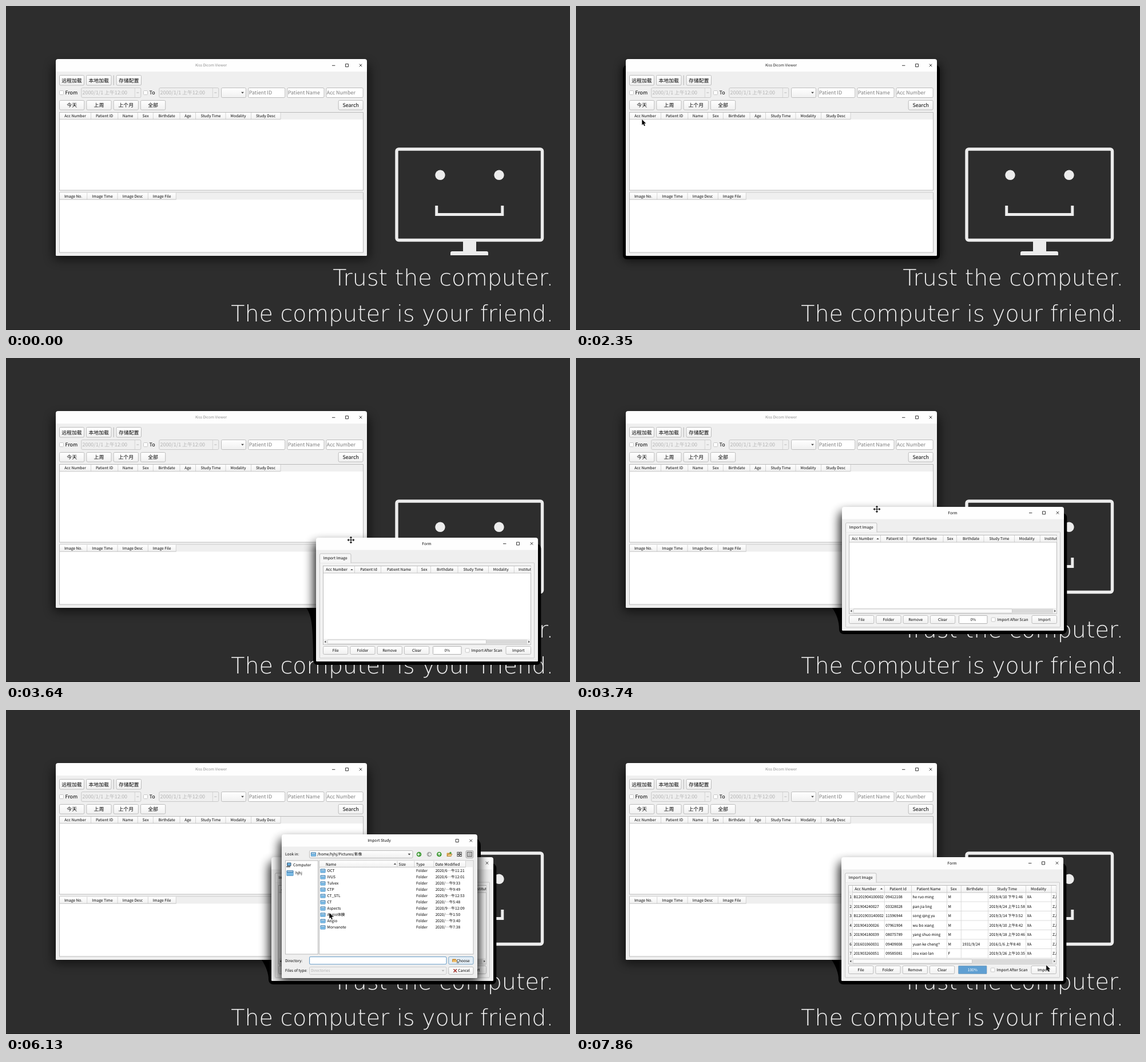
An HTML page for the animation above (8000 ms loop, 986 by 568 pixels).

```html
<!DOCTYPE html>
<html lang="zh-CN">
<head>
<meta charset="utf-8">
<title>Dicom import</title>
<style>
html, body { margin: 0; width: 100%; height: 100%; overflow: hidden; background: #2d2d2d; }
svg { display: block; width: 100%; height: 100%; }
text { font-family: "Noto Sans CJK SC", "Noto Sans CJK JP", "Noto Sans CJK", "Noto Sans", sans-serif; text-rendering: geometricPrecision; white-space: pre; }
.wall { font-family: "DejaVu Sans", sans-serif; font-weight: 200; font-size: 39.6px; fill: #f2f2f2; text-anchor: end; }
</style>
</head>
<body>
<svg id="stage" viewBox="0 0 986 568" xmlns="http://www.w3.org/2000/svg"></svg>
<script>
const LOOP = 8000, SMALL = 6.65, BIG = 8.9;
const $ = id => document.getElementById(id);

// Markup helpers
const group = (id, body, extra = '') => `<g id="${id}" ${extra}>${body}</g>`;
const rect = (x, y, w, h, fill, extra = '') =>
  `<rect x="${x}" y="${y}" width="${w}" height="${h}" fill="${fill}" ${extra}/>`;
const path = (d, stroke, w = 1, fill = 'none') =>
  `<path d="${d}" fill="${fill}" stroke="${stroke}" stroke-width="${w}"/>`;
const text = (x, y, s, size = SMALL, extra = '') =>
  `<text x="${x}" y="${y + size * 0.37}" font-size="${size}" ${extra}>${s}</text>`;
const mid = (x, y, s, size, fill) =>
  text(x, y, s, size, 'text-anchor="middle"' + (fill ? ` fill="${fill}"` : ''));
const box = (x, y, w, h, fill = '#fff', line = '#b4b4b4', r = 0) =>
  rect(x + .5, y + .5, w - 1, h - 1, fill, `stroke="${line}" stroke-width=".9" rx="${r}"`);
const button = (x, y, w, h, label, size) =>
  box(x, y, w, h, 'url(#raised)', '#b6b6b6', 2) + mid(x + w / 2, y + h / 2, label, size);
const check = (x, y, s) => box(x, y, s, s, '#fff', '#c2c2c2', 1);
const arrow = (x, y, fill = '#444') => `<path d="M${x - 2.4} ${y - 1.2}h4.8l-2.4 2.6z" fill="${fill}"/>`;
const sortMark = (x, y) => `<path d="M${x - 2.2} ${y + 1}h4.4l-2.2 -2.4z" fill="#444"/>`;

function windowIcons(x, y, withMin) {
  const c = '#3a3a3a';
  return (withMin ? path(`M${x - 50} ${y + .3}h5.4`, c) : '') +
    path(`M${x - 26.5} ${y - 2.4}h5v5h-5z`, c) +
    path(`M${x - 2.3} ${y - 2.3}l4.6 4.6m0 -4.6l-4.6 4.6`, c);
}

const shade = (id, x, y, w, h) =>
  rect(x - 4, y + 9, w + 8, h - 3, '#000', `id="${id}" rx="6" opacity=".9" filter="url(#soft)"`);

function frame(x, y, w, h, bar) {
  const top = `M${x} ${y + bar}v${4 - bar}q0 -4 4 -4h${w - 8}q4 0 4 4v${bar - 4}z`;
  return rect(x, y + 6, w, h - 6, '#efefef', 'rx="1.5"') + `<path d="${top}" fill="#fefefe"/>`;
}

// Header strip: cell edges, then centred labels
function header(x, y, h, edges, centers, labels) {
  const end = edges[edges.length - 1];
  return rect(x, y, end - x, h, 'url(#raised)') +
    edges.map(e => path(`M${e} ${y}v${h}`, '#cacaca', .8)).join('') +
    path(`M${x} ${y + h}H${end}`, '#b9b9b9', .8) +
    labels.map((s, i) => mid(centers[i], y + h / 2, s)).join('');
}

function folder(x, y, w) {
  const h = w * .78;
  return rect(x, y - h / 2, w, h, '#2f76ad', 'rx="1"') +
    rect(x + 1, y - h / 2 + 1.2, w - 2, 1.2, '#e8f2f9') +
    rect(x + .4, y - h / 2 + h * .4, w - .8, h * .55, '#79b9e4', 'rx=".6"');
}

function wallpaper() {
  const c = '#ececec';
  return rect(0, 0, 986, 568, '#2d2d2d') + rect(0, 567, 986, 1, '#202020') +
    rect(683, 251, 254.5, 159.5, 'none', `stroke="${c}" stroke-width="5.4" rx="3.5"`) +
    rect(799, 412, 23, 19, c) +
    `<path d="M777 437v-4q0 -3 3 -3h60q3 0 3 3v4z" fill="${c}"/>` +
    [759, 862].map(x => `<circle cx="${x}" cy="296.3" r="8.7" fill="${c}"/>`).join('') +
    path('M752.7 350V365.6H867.8V350', c, 5) +
    '<text class="wall" x="957" y="490">Trust the computer.</text>' +
    '<text class="wall" x="957" y="553.4">The computer is your friend.</text>';
}

function mainWindow() {
  const grey = 'fill="#7d7d7d"', off = 'fill="#b3b3b3"';
  const date = x => box(x, 143, 105, 18, '#efefef', '#c4c4c4', 2) +
    path(`M${x + 94} 143.5v17`, '#cfcfcf', .8) + path(`M${x + 97} 152h4`, '#b8b8b8') +
    text(x + 2.3, 152, '2000/1/1 上午12:00', BIG, off);
  return frame(87, 93, 544, 345, 22) +
    group('mainTitle', mid(358.5, 104, 'Kiss Dicom Viewer', 6.55)) + windowIcons(620, 104, true) +
    button(93, 121, 44, 18.5, '远程加载', BIG) + button(140, 121, 44.5, 18.5, '本地加载', BIG) +
    path('M188.2 121.5v17.5', '#b0b0b0') + button(192.5, 121, 44.5, 18.5, '存储配置', BIG) +
    check(93, 148, 8) + text(103.5, 152, 'From', BIG) + date(131.3) +
    check(240, 148, 8) + text(250.5, 152, 'To', BIG) + date(267.3) +
    box(376, 143, 44, 18, 'url(#raised)', '#b6b6b6', 2) + arrow(413.5, 152) +
    ['Patient ID', 'Patient Name', 'Acc Number'].map((s, i) =>
      box(423 + 68.2 * i, 143, 65.3, 18, '#fff', '#b4b4b4', 2) + text(424.8 + 68 * i, 152, s, BIG, grey)).join('') +
    ['今天', '上周', '上个月', '全部'].map((s, i) => button(93 + 47.3 * i, 165, 44.3, 17.6, s, BIG)).join('') +
    button(580.7, 165, 44, 17.6, 'Search', BIG) +
    box(93, 186, 532, 137.5) + rect(94, 187, 530, 12, '#efefef') +
    header(94, 187, 11.7, [148.5, 195.7, 230.3, 257.3, 304, 331.5, 384, 428.5, 480],
      [121, 172, 213, 244, 281, 318, 358, 406, 454],
      ['Acc Number', 'Patient ID', 'Name', 'Sex', 'Birthdate', 'Age', 'Study Time', 'Modality', 'Study Desc']) +
    box(93, 326.5, 532, 106) + rect(94, 327.5, 530, 12, '#efefef') +
    header(94, 327.5, 11.7, [141.7, 195, 248.3, 297.3], [117.5, 168.5, 221.5, 272.5],
      ['Image No.', 'Image Time', 'Image Desc', 'Image File']);
}

const patients = [
  'B1201904100002|09412108|he ruo ming|M||2019/4/10 下午1:46',
  '201904240027|03328028|pan jia ling|M||2019/4/24 上午11:58',
  'B1201903140002|11596944|song qing yu|M||2019/3/14 下午3:52',
  '201904100026|07961904|wu bo xiang|M||2019/4/10 上午8:42',
  '201904180039|08075789|yang shuo ming|M||2019/4/18 上午10:46',
  '201601060031|09409008|yuan ke cheng^|M|1931/9/24|2016/1/6 上午8:40',
  '201903260051|09585081|zou xiao lan|F||2019/3/26 上午10:35'
];
const formCols = ['Acc Number', 'Patient Id', 'Patient Name', 'Sex', 'Birthdate', 'Study Time', 'Modality'];
const cellEdges = [19.5, 75.3, 122.5, 184.5, 209.3, 256.5, 322.5, 367, 400];

// Drawn in window coordinates and moved as a whole
function formWindow() {
  const row = (line, i) => {
    const y = 69.6 + 16.5 * i, cells = (line + '|XA|ZJ').split('|');
    return group('row' + i, rect(13, y - 8, 6.5, 16.5, '#f4f4f4') + mid(16.2, y, i + 1) +
      cellEdges.map(x => path(`M${x} ${y - 8}v16.5`, '#d3d3d3', .8)).join('') +
      path(`M13 ${y + 8.4}H376`, '#d3d3d3', .8) +
      cells.map((s, k) => text(cellEdges[k] + 2, y, s)).join(''));
  };
  const scroll = (id, end) => group(id, box(19.5, 178.5, end - 19.5, 8, '#fafafa', '#c8c8c8', 1));
  return frame(0, 0, 388, 217, 21.5) + mid(193.5, 10.5, 'Form') + windowIcons(377, 10.3, true) +
    box(6, 43.5, 376, 168, '#f2f2f2', '#c4c4c4', 1) +
    '<path d="M6.5 44.5V30q0 -2 2 -2h50.5q2 0 2 2V44.5" fill="#f6f6f6" stroke="#bcbcbc" stroke-width=".9"/>' +
    mid(33.6, 36, 'Import Image') + box(12, 49, 364, 139) +
    '<g clip-path="url(#cells)">' +
    group('headEmpty', header(13, 50, 12, [67.5, 113.5, 177, 200.5, 248, 301.5, 346.3, 400],
      [36, 92, 145, 189, 225.5, 275, 323.3], formCols) + text(354, 56, 'Institution') + sortMark(62.5, 56)) +
    group('headFull', header(13, 50, 12, cellEdges, [42, 99, 152.5, 196, 233, 289.5, 344.5], formCols) + sortMark(70, 55.5)) +
    patients.map(row).join('') +
    rect(13, 177.5, 362.5, 10, '#f0f0f0') + rect(20, 178.5, 349, 8, '#dadada') +
    scroll('barWide', 298) + scroll('barShort', 229) + '</g>' +
    '<path d="M17.2 180.5v4l-2.4 -2zM371.3 180.5v4l2.4 -2z" fill="#444"/>' +
    ['File', 'Folder', 'Remove', 'Clear'].map((s, i) => button(12 + 47.3 * i, 190, 44.3, 15, s)).join('') +
    box(204, 190, 50.5, 15, '#fff', '#aaa', 1) + rect(204.5, 190.5, 0, 14, '#5f9fd2', 'id="fill"') +
    text(229.3, 197.6, '0%', SMALL, 'text-anchor="middle" id="percent"') +
    check(260.7, 193.7, 7.8) + text(271.3, 197.6, 'Import After Scan') + button(331.5, 190, 44.5, 15, 'Import');
}

const studies = ['Zouxiaolan', 'Yuankecheng', 'Yangshuoming-LCX', 'Yangshuoming-LAD', 'Wuboxiang',
  'Songqingyu', 'Panjialing', 'Heruoming'].map(s => [s, '2020/…午4:20']);
const parent = [['OCT', '2020/6…午11:21'], ['IVUS', '2020/6…午12:01'], ['Tulvex', '2020/…午9:33'],
  ['CTP', '2020/…午9:49'], ['CT_STL', '2020/9…午12:53'], ['CT', '2020/…午5:48'], ['Aspects', '2020/9…午12:09'],
  ['Angio体膜', '2020/…午1:50'], ['Angio', '2020/…午3:40'], ['Morvanote', '2020/…午7:38']];

function dialogWindow() {
  const list = (id, dir, rows) => group(id, text(544, 253, dir) + rows.map(([name, date], i) => {
    const y = 282 + 11 * i;
    return folder(549.5, y, 9) + `<g class="${name}">` + text(561.5, y, name) +
      text(717, y, 'Folder') + text(750.7, y, date) + '</g>';
  }).join(''));
  const disc = (x, fill, turn) => `<g transform="translate(${x} 253) rotate(${turn})">
    <circle r="4.3" fill="${fill}"/><path d="M2.5 0H-2M0 -2.2L-2.3 0L0 2.2" fill="none" stroke="#fff" stroke-width="1.2"/></g>`;
  const tiles = [0, 1, 2, 3].map(i => rect(789 + (i % 2) * 4.3, 249.3 + (i >> 1) * 4.3, 3, 3, '#fff', 'stroke="#333" stroke-width=".9"')).join('');
  return frame(482, 218, 342, 252, 21.5) + mid(652.5, 229, 'Import Study') + windowIcons(812.7, 229) +
    text(488, 253, 'Look in:') + box(530, 246, 181.5, 14, 'url(#raised)', '#b6b6b6', 2) + folder(533, 253, 9) + arrow(705, 253) +
    disc(722, '#3f9a35', 0) + disc(740, '#a9a9a9', 180) + disc(757.3, '#3f9a35', 90) +
    rect(770.5, 250.5, 8, 6, '#d9a24c', 'rx="1"') + path('M771 256.5l2 -4h7l-2 4z', '#8a6324', .6, '#efc67c') +
    '<circle cx="777" cy="250.5" r="1.7" fill="#4a9e3d"/>' + tiles +
    box(803.5, 246, 14, 14, '#d6d6d6', '#a5a5a5', 2) + rect(806.7, 249.3, 7.4, 7.4, '#fff', 'stroke="#333" stroke-width=".9"') +
    path('M808 251.3h5m-5 1.8h5m-5 1.8h5', '#444', .7) +
    box(488, 263.5, 58, 165) + rect(491, 267.5, 7.5, 6, '#35546e', 'rx=".8"') + rect(492, 268.5, 5.5, 3.6, '#6fb2e0') +
    rect(490, 274, 7, 1.5, '#555') + text(502, 271.5, 'Computer') + folder(490.5, 286, 12) + text(506, 286, 'hjhj') +
    box(547.2, 263.5, 270.3, 165) + rect(548.2, 264.5, 268.3, 11, '#efefef') +
    header(548.2, 264.5, 11, [684, 714, 748, 803.5], [], []) +
    text(559, 270.3, 'Name') + sortMark(680, 270) + text(686.5, 270.3, 'Size') + text(717, 270.3, 'Type') + text(750.5, 270.3, 'Date Modified') +
    rect(548.2, 364.5, 255.3, 11, '#4b92c8', 'id="pick"') +
    list('studies', '/home/hjhj/Pictures/影像/Angio', studies) + list('parent', '/home/hjhj/Pictures/影像', parent) +
    text(488, 439.3, 'Directory:') + box(530, 432, 240.5, 14.3, '#fff', '#4a86b8', 2) +
    rect(531, 433, 238.5, 12.3, 'none', 'stroke="#a9cbe6" stroke-width=".7" rx="1.5"') +
    group('dirName', text(533, 439.3, 'Angio')) + group('caret', path('M532.7 434.8v9', '#222', .7)) +
    box(773.3, 432, 44.2, 14.3, '#e3edf5', '#6f9cc0', 2) + rect(780, 436.5, 7, 5.5, '#c98a32', 'rx="1"') + rect(781, 438.5, 7, 3.5, '#f0c070') +
    text(787.7, 439.3, '<tspan text-decoration="underline">C</tspan>hoose') +
    text(488, 457, 'Files of type:') + box(530, 450, 240.5, 14, '#efefef', '#cacaca', 2) +
    text(533, 457, 'Directories', SMALL, 'fill="#b3b3b3"') + arrow(764, 457, '#b8b8b8') +
    box(773.3, 450, 44.2, 14, 'url(#raised)', '#b6b6b6', 2) + path('M782.5 454.2l5.5 5.6m0 -5.6l-5.5 5.6', '#a3322b', 1.6) +
    text(790.2, 457, 'Cancel');
}

function pointers() {
  const cross = 'M0 -5.3V5.3M-5.3 0H5.3M-1.7 -3.7L0 -5.5L1.7 -3.7M-1.7 3.7L0 5.5L1.7 3.7M-3.7 -1.7L-5.5 0L-3.7 1.7M3.7 -1.7L5.5 0L3.7 1.7';
  const beam = 'M-2 -4.5H2M0 -4.5V4.5M-2 4.5H2';
  return group('hand', '<path d="M0 0V10.3L2.3 8.3L4 12L5.9 11.2L4.3 7.5H7.4Z" stroke="#fff" stroke-width=".5" stroke-opacity=".7"/>') +
    group('cross', path(cross, '#fff', 1.9) + path(cross, '#000', 1.1)) +
    group('beam', path(beam, '#fff', 2) + path(beam, '#111', 1));
}

// Floating windows shade only the windows below them; on the wallpaper they leave a hard black edge
$('stage').innerHTML = `<defs>
  <linearGradient id="raised" x2="0" y2="1"><stop stop-color="#fff"/><stop offset="1" stop-color="#f0f0f0"/></linearGradient>
  <filter id="soft" x="-20%" y="-20%" width="140%" height="150%"><feGaussianBlur stdDeviation="9"/></filter>
  <clipPath id="onMain"><rect x="87" y="93" width="544" height="345"/></clipPath>
  <clipPath id="onBoth"><rect x="87" y="93" width="544" height="345"/><rect x="464" y="258" width="388" height="217"/></clipPath>
  <clipPath id="cells"><rect x="12.5" y="49.5" width="363" height="138"/></clipPath></defs>` +
  wallpaper() + shade('mainShade', 87, 93, 544, 345) +
  rect(82, 104, 554, 340, '#000', 'id="mainEdge" rx="7"') +
  group('formEdge', rect(-5, 11, 398.3, 212, '#000', 'rx="8"')) +
  '<path id="wedge"/>' +
  rect(477, 224, 353, 240, '#000', 'id="dialogEdge" rx="14"') +
  group('main', mainWindow()) +
  `<g clip-path="url(#onMain)">${shade('formShade', 0, 0, 388, 217)}</g>` + group('form', formWindow()) +
  `<g clip-path="url(#onBoth)">${shade('dialogShade', 482, 218, 342, 252)}</g>` + group('dialog', dialogWindow()) +
  rect(0, 0, 0, 0, 'rgba(20,55,85,.2)', 'id="press" stroke="#3f78a8" stroke-width="1" rx="2"') +
  group('pointer', pointers());

const stops = [[1890, 602, 175], [2180, 330, 196], [2400, 84, 199], [2520, 120, 150], [2640, 162, 131],
  [2850, 162, 131], [3200, 480, 290], [3480, 660, 359], [3560, 660, 359], [3740, 526, 265], [3800, 525, 262],
  [3900, 525, 262], [4250, 545, 452], [4400, 545, 449], [4460, 546, 438], [5010, 546, 438], [5330, 735, 226],
  [5560, 757, 256], [5860, 757, 256], [6120, 565, 355], [6220, 570, 367], [6340, 570, 367], [6600, 793, 434],
  [6700, 793, 434], [7100, 752, 428], [7500, 748, 428], [7800, 822, 447]];
const presses = [[1270, 1910, 581.2, 165.5, 43, 16.6], [2650, 2730, 140.5, 121.5, 43.5, 17.5],
  [4290, 4400, 523.8, 448.5, 43.3, 14], [5640, 5740, 750.5, 246.5, 13.5, 13], [6610, 6670, 773.8, 432.5, 43.2, 13.3]];

const clamp = (v, a = 0, b = 1) => Math.min(b, Math.max(a, v));
const show = (id, on) => { $(id).style.display = on ? '' : 'none'; };
const move = (id, x, y) => $(id).setAttribute('transform', `translate(${x} ${y})`);

function pointerAt(t) {
  const i = stops.findIndex(s => s[0] > t);
  if (i < 0) return stops[stops.length - 1].slice(1);
  if (!i) return stops[0].slice(1);
  const [a, b] = [stops[i - 1], stops[i]], p = (t - a[0]) / (b[0] - a[0]), k = p * p * (3 - 2 * p);
  return [a[1] + (b[1] - a[1]) * k, a[2] + (b[2] - a[2]) * k];
}

function draw(t) {
  const [px, py] = pointerAt(t);
  const formOpen = t >= 2730, dialogOpen = t >= 4420 && t < 6670, active = t >= 950 && !formOpen;

  $('mainTitle').setAttribute('fill', active ? '#1c1c1c' : '#8c8c8c');
  $('mainShade').setAttribute('opacity', active ? .85 : .6);
  $('mainEdge').setAttribute('opacity', t < 1070 ? .5 : 1);
  show('mainEdge', active);

  // The form follows the pointer while dragged
  const [gx, gy] = pointerAt(clamp(t, 3560, 3800)), fx = gx - 61, fy = gy - 4;
  for (const id of ['form', 'formEdge', 'formShade', 'wedge']) show(id, formOpen);
  for (const id of ['form', 'formEdge', 'formShade']) move(id, fx, fy);
  const foot = Math.min(fy + 215, 568);
  $('wedge').setAttribute('d', `M${fx - 17} 438C${fx - 9} 450 ${fx - 5} 462 ${fx - 5} ${foot}H${fx + 10}V438Z`);

  const scan = clamp((t - 6760) / 560), count = Math.floor(scan * patients.length);
  patients.forEach((_, i) => show('row' + i, i < count));
  show('headEmpty', !count);
  show('headFull', count);
  show('barWide', !count);
  show('barShort', count);
  $('fill').setAttribute('width', 49.5 * count / patients.length);
  $('percent').textContent = Math.round(100 * count / patients.length) + '%';
  $('percent').setAttribute('fill', count > 3 ? '#fff' : '#1c1c1c');

  const up = t >= 5700, picked = t >= 6270;
  for (const id of ['dialog', 'dialogEdge', 'dialogShade']) show(id, dialogOpen);
  show('studies', !up);
  show('parent', up);
  show('pick', picked);
  show('dirName', picked);
  show('caret', t < 5010 || !picked && Math.floor((t - 4010) / 500) % 2 === 1);
  document.querySelector('.Angio').setAttribute('fill', picked ? '#fff' : '#000');

  const hit = presses.find(p => t >= p[0] && t < p[1]);
  show('press', hit);
  if (hit) {
    ['x', 'y', 'width', 'height'].forEach((k, i) => $('press').setAttribute(k, hit[i + 2]));
    const search = hit === presses[0];
    $('press').setAttribute('opacity', search ? clamp((t - 1250) / 100) : 1);
    $('press').setAttribute('fill-opacity', search ? 1 - .8 * clamp((t - 1520) / 150) : 1);
  }

  const drag = t >= 3560 && t < 3820;
  const typing = dialogOpen && px > 530 && px < 770 && py > 432 && py < 446;
  show('pointer', t >= 1890);
  move('pointer', px, py);
  show('cross', drag);
  show('beam', typing);
  show('hand', !drag && !typing);
}

function tick(now) {
  draw(now % LOOP);
  requestAnimationFrame(tick);
}
draw(0);
requestAnimationFrame(tick);
</script>
</body>
</html>
```
